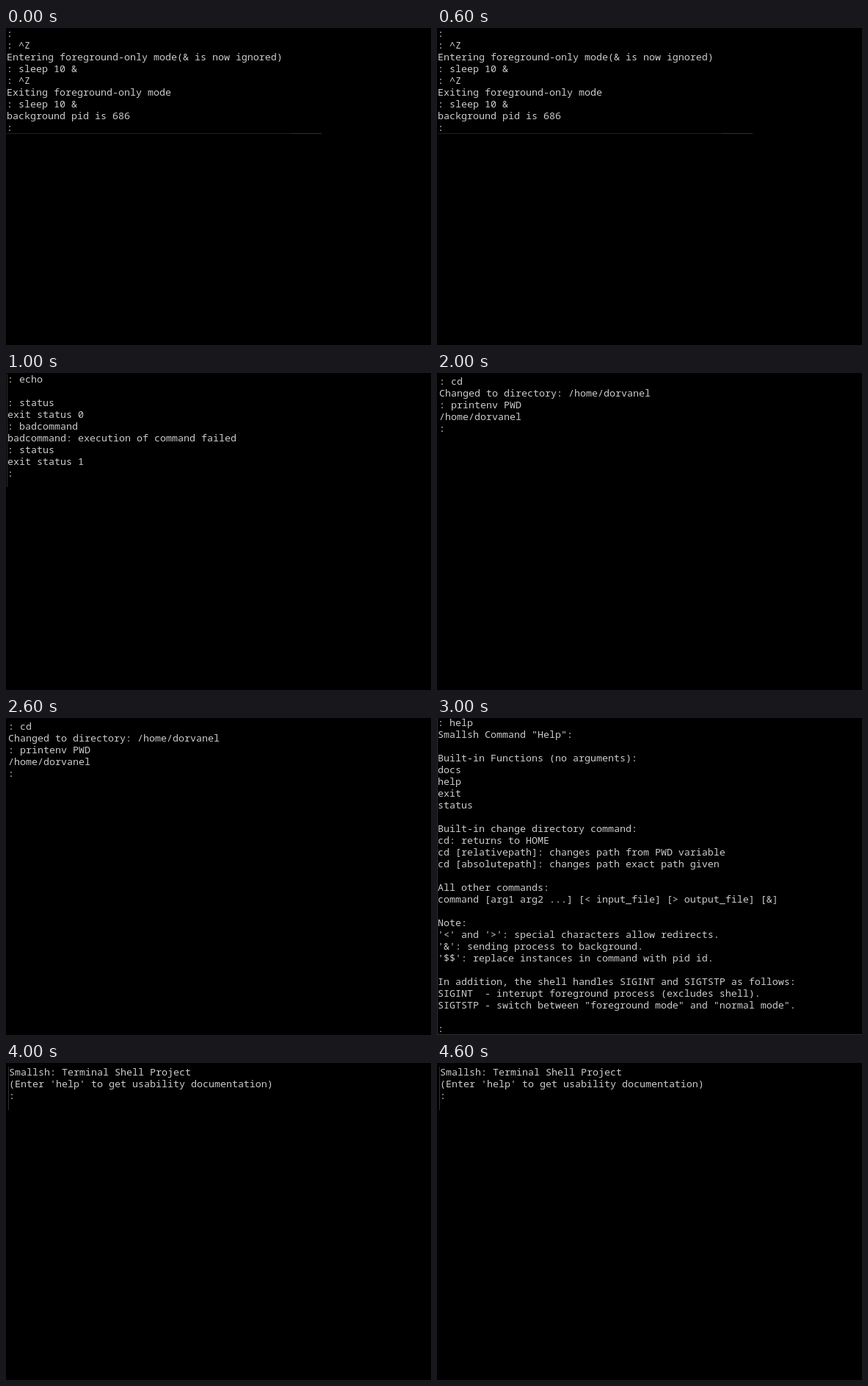
Write an HTML page that moves like this. It is 579 by 431 pixels and loops after 5000 ms.

```html
<!DOCTYPE html>
<html lang="en">
<head>
<meta charset="utf-8">
<title>Shell screens</title>
<style>
  html, body {
    margin: 0;
    width: 100%;
    height: 100%;
    overflow: hidden;
    background: #000;
  }
  .screen {
    position: absolute;
    inset: 0;
    overflow: hidden;
    visibility: hidden;
    animation: show 5s step-end infinite;
    animation-delay: calc((var(--i) - 5) * 1s);
  }
  pre {
    position: absolute;
    left: var(--x);
    top: var(--y);
    margin: 0;
    font: 13.333px/16px "Noto Sans Mono", "DejaVu Sans Mono", monospace;
    font-variant-ligatures: none;
    color: #ccc;
  }
  /* faint window edges left around the terminal */
  .edge {
    position: absolute;
    background: #303030;
  }
  @keyframes show {
    0% { visibility: visible; }
    20%, 100% { visibility: hidden; }
  }
</style>
</head>
<body>
<div class="screen" style="--i:0; --x:1px; --y:-1px">
<pre>:
: ^Z
Entering foreground-only mode(&amp; is now ignored)
: sleep 10 &amp;
: ^Z
Exiting foreground-only mode
: sleep 10 &amp;
background pid is 686
:</pre>
  <div class="edge" style="left:1px; top:143px; width:429px; height:1px; background:#1f2420"></div>
  <div class="edge" style="left:388px; top:143px; width:42px; height:1px"></div>
</div>

<div class="screen" style="--i:1; --x:2px; --y:0px">
<pre>: echo

: status
exit status 0
: badcommand
badcommand: execution of command failed
: status
exit status 1
:</pre>
  <div class="edge" style="left:1px; top:1px; width:1px; height:154px"></div>
</div>

<div class="screen" style="--i:2; --x:3px; --y:3px">
<pre>: cd
Changed to directory: /home/dorvanel
: printenv PWD
/home/dorvanel
:</pre>
</div>

<div class="screen" style="--i:3; --x:1px; --y:-2px">
<pre>: help
Smallsh Command "Help":

Built-in Functions (no arguments):
docs
help
exit
status

Built-in change directory command:
cd: returns to HOME
cd [relativepath]: changes path from PWD variable
cd [absolutepath]: changes path exact path given

All other commands:
command [arg1 arg2 ...] [&lt; input_file] [&gt; output_file] [&amp;]

Note:
'&lt;' and '&gt;': special characters allow redirects.
'&amp;': sending process to background.
'$$': replace instances in command with pid id.

In addition, the shell handles SIGINT and SIGTSTP as follows:
SIGINT  - interupt foreground process (excludes shell).
SIGTSTP - switch between "foreground mode" and "normal mode".

:</pre>
  <div class="edge" style="left:0; top:0; width:1px; height:431px"></div>
  <div class="edge" style="left:0; top:430px; width:579px; height:1px"></div>
</div>

<div class="screen" style="--i:4; --x:4px; --y:4px">
<pre>Smallsh: Terminal Shell Project
(Enter 'help' to get usability documentation)
:</pre>
  <div class="edge" style="left:3px; top:5px; width:1px; height:59px"></div>
</div>
</body>
</html>
```
